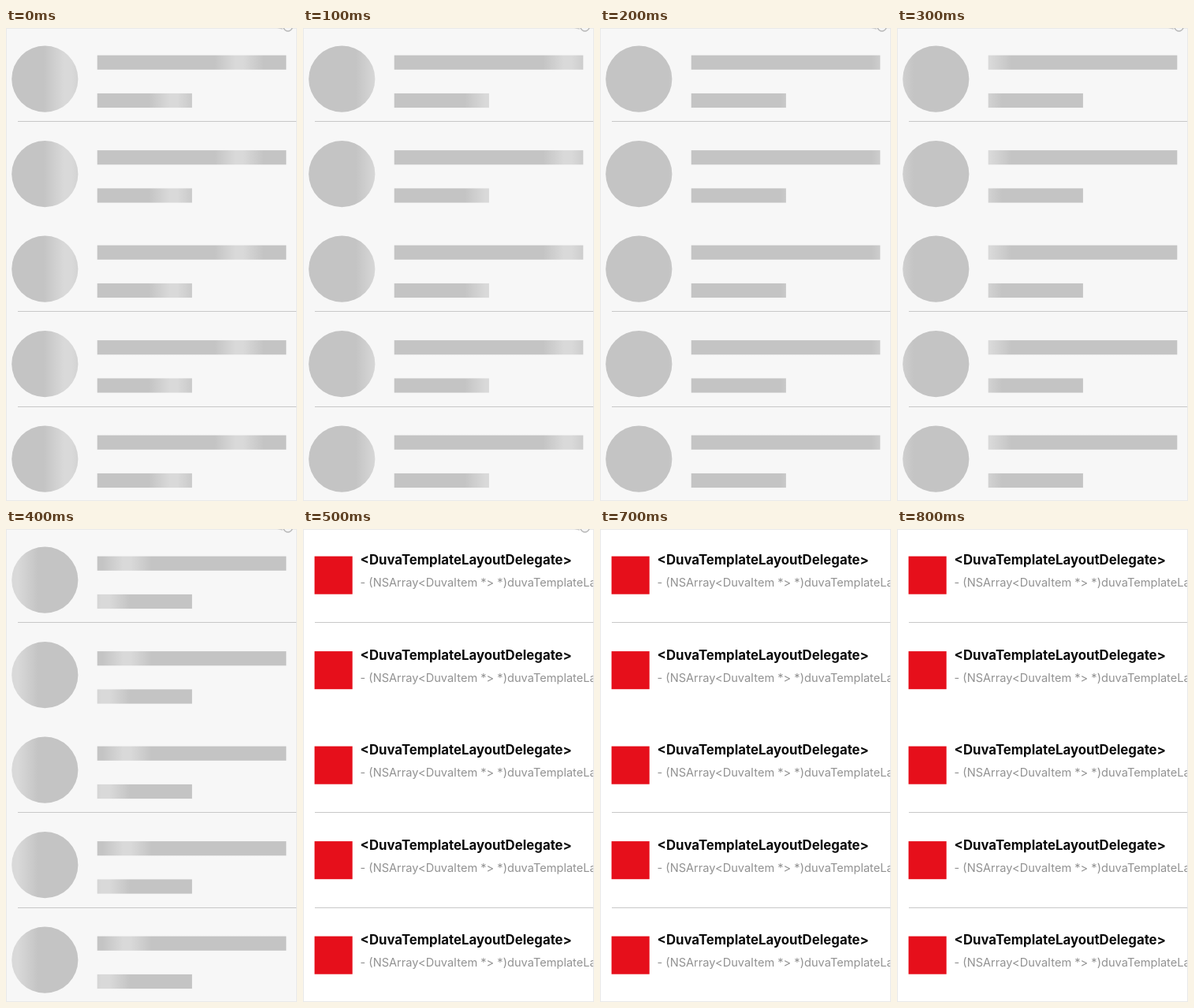
Recreate the animation shown at these times as an HTML page. Size 369x600 px, loop 0.9 s.

```html
<!DOCTYPE html>
<html lang="en">
<head>
<meta charset="utf-8">
<title>Skeleton list loading</title>
<style>
  html, body { margin: 0; width: 100%; height: 100%; overflow: hidden; background: #fff; }
  svg { display: block; width: 369px; height: 600px; }
  text { font-family: Inter, "Liberation Sans", sans-serif; white-space: pre; }
  .title { font-size: 16.8px; font-weight: 700; fill: #0a0a0a; }
  .detail { font-size: 14.6px; fill: #929292; }
</style>
</head>
<body>
<svg viewBox="0 0 369 600">
  <defs id="gradients"></defs>
  <rect id="backdrop" width="369" height="600"/>
  <g id="skeleton"></g>
  <g id="content"></g>
  <path d="M15 118.5H369M15 359.5H369M15 480.5H369" stroke="#c8c8c8"/>
  <rect x=".5" y=".5" width="368" height="599" fill="none" stroke="#e9e9e9"/>
  <g id="pointer">
    <path d="M344 0h6l1 2z" fill="#ccc"/>
    <path d="M352 0Q354 4 357.5 4T363 0" fill="#f4f4f4" stroke="#b8b8b8" stroke-width="1.5"/>
  </g>
</svg>
<script>
const LOOP = 900, STEP = 100, LOADED_AT = 500, POINTER_GONE_AT = 700;
const ROWS = 5, ROW_HEIGHT = 120.5;
const GLOW = 31; // half width of the shimmer band
const spans = {
  avatar: { x: 7.3, width: 84.3 },
  long: { x: 115.7, width: 239.6 },
  short: { x: 115.7, width: 120.2 }
};
const byId = id => document.getElementById(id);

byId('gradients').innerHTML = Object.keys(spans).map(name => `
  <linearGradient id="${name}" gradientUnits="userSpaceOnUse">
    <stop offset="0" stop-color="#c4c4c4"/>
    <stop offset=".42" stop-color="#d9d9d9"/>
    <stop offset=".58" stop-color="#d9d9d9"/>
    <stop offset="1" stop-color="#c4c4c4"/>
  </linearGradient>`).join('');

const repeatRows = markup => Array.from({ length: ROWS }, (_, i) =>
  `<g transform="translate(0 ${i * ROW_HEIGHT})">${markup}</g>`).join('');

const bar = (name, y) =>
  `<rect x="${spans[name].x}" y="${y}" width="${spans[name].width}" height="18.2" fill="url(#${name})"/>`;

byId('skeleton').innerHTML = repeatRows(`
  <circle cx="49.3" cy="64.7" r="42.1" fill="url(#avatar)"/>
  ${bar('long', 34.6)}
  ${bar('short', 82.9)}`);

byId('content').innerHTML = repeatRows(`
  <rect x="14.6" y="34.6" width="48.1" height="48.1" fill="#e60f1b"/>
  <text class="title" x="72.5" y="45">&lt;DuvaTemplateLayoutDelegate&gt;</text>
  <text class="detail" x="72.5" y="73">- (NSArray&lt;DuvaItem *&gt; *)duvaTemplateLayout</text>`);

const show = (id, visible) => byId(id).setAttribute('visibility', visible ? 'visible' : 'hidden');

function render(now) {
  const time = Math.floor((now % LOOP) / STEP) * STEP;
  const loading = time < LOADED_AT;
  show('skeleton', loading);
  show('content', !loading);
  show('pointer', time < POINTER_GONE_AT);
  byId('backdrop').setAttribute('fill', loading ? '#f7f7f7' : '#fff');

  const progress = (0.7 + time * 0.00132) % 1;
  for (const [name, { x, width }] of Object.entries(spans)) {
    const start = x - 2 * GLOW + progress * (width + 2 * GLOW);
    byId(name).setAttribute('x1', start);
    byId(name).setAttribute('x2', start + 2 * GLOW);
  }
}

const origin = performance.now();
function tick() {
  render(performance.now() - origin);
  requestAnimationFrame(tick);
}
tick();
</script>
</body>
</html>
```
